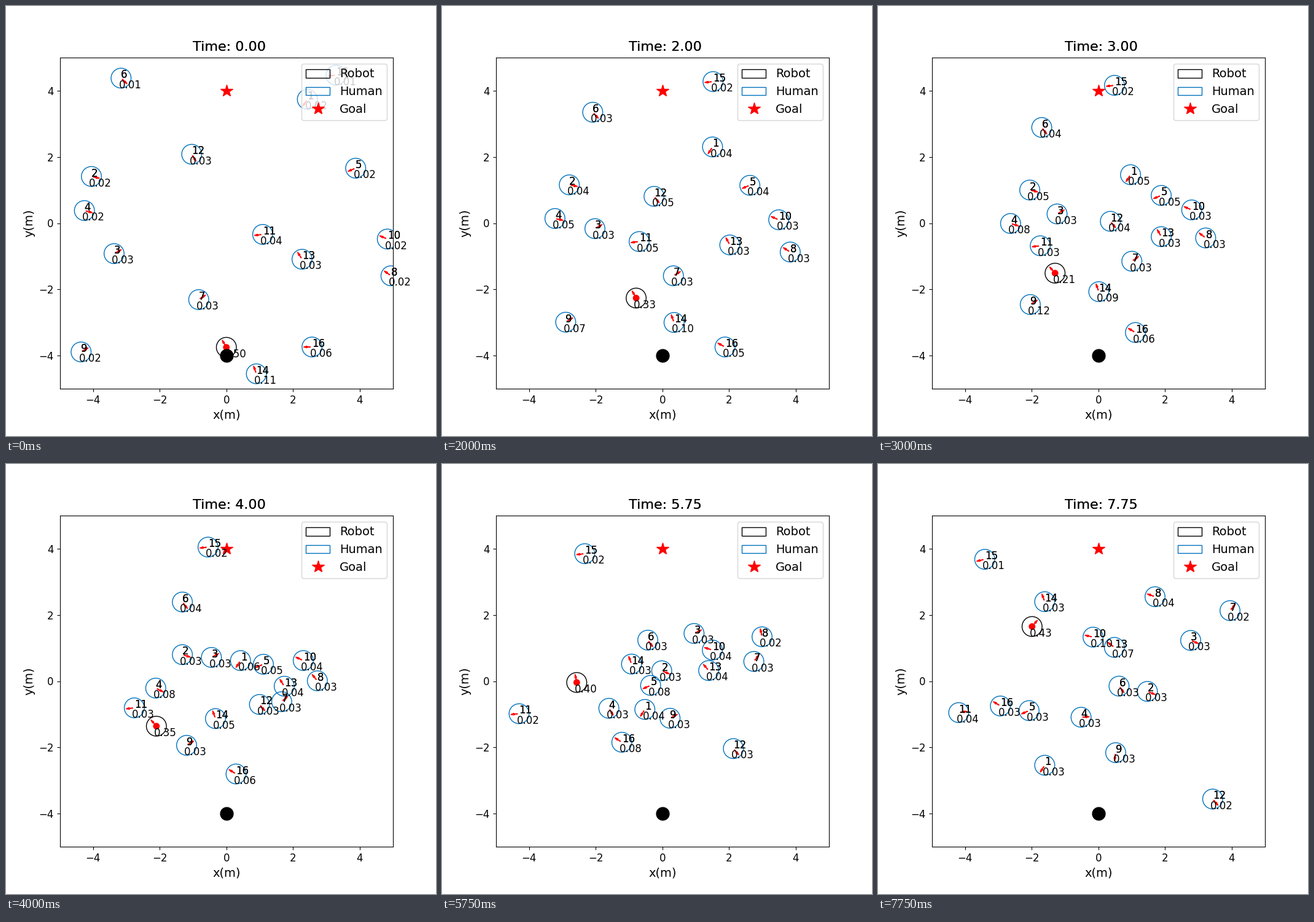
A matplotlib script for the animation above (8000 ms loop, 700 by 700 pixels).

```python
import numpy as np
import matplotlib.pyplot as plt
from matplotlib.animation import FuncAnimation
from matplotlib.lines import Line2D
from matplotlib.patches import ArrowStyle, Circle, FancyArrowPatch

STEP = 0.25
FRAMES = 32
END = (FRAMES - 1) * STEP
RADIUS = 0.3
BLUE = "#0072bd"
ARROW = ArrowStyle.Fancy(head_length=4, head_width=2, tail_width=0.6)

fig, ax = plt.subplots(figsize=(7, 7), dpi=100)
ax.tick_params(labelsize=12)
ax.set_xlim(-5, 5)
ax.set_ylim(-5, 5)
ax.set_xlabel("x(m)", fontsize=14)
ax.set_ylabel("y(m)", fontsize=14)


def ramp(t):
    """Time lost while speeding up from a slow start."""
    return t - 0.3 * (1 - np.exp(-2 * t))


def neighbour_span(a):
    """Difference between the next and the previous row, ends held."""
    padded = np.concatenate([a[:1], a, a[-1:]])
    return padded[2:] - padded[:-2]


def twin_text(x, y, label, **kw):
    """Two stacked copies, which gives the slightly heavier lettering."""
    return [ax.text(x, y, label, **kw) for _ in range(2)]


class Agent:
    """Follows a smooth curve through the (t, x, y) points where it turns."""

    def __init__(self, name, *turns):
        turns = np.array(turns, float)
        self.times = ramp(turns[:, 0])
        self.pts = turns[:, 1:]
        self.vel = neighbour_span(self.pts) / neighbour_span(self.times)[:, None]

        self.ring = Circle((0, 0), RADIUS, fill=False, color=BLUE if name else "black")
        self.arrow = FancyArrowPatch((0, 0), (RADIUS, 0), color="red", arrowstyle=ARROW)
        ax.add_artist(self.ring)
        ax.add_artist(self.arrow)
        self.names = twin_text(0, 0, name, fontsize=12)
        self.note = ax.text(0, 0, "", fontsize=12)

    def move(self, t):
        t = ramp(t)
        i = min(np.searchsorted(self.times, t, side="right"), len(self.times) - 1) - 1
        h = self.times[i + 1] - self.times[i]
        s = (t - self.times[i]) / h
        p, q = self.pts[i:i + 2]
        u, v = self.vel[i:i + 2] * h
        a, b = 2 * (p - q) + u + v, 3 * (q - p) - 2 * u - v
        self.pos = ((a * s + b) * s + u) * s + p
        slope = (3 * a * s + 2 * b) * s + u
        self.heading = slope / max(np.hypot(*slope), 1e-9)

    def draw(self, score):
        x, y = self.pos
        self.ring.center = self.pos
        self.arrow.set_positions(self.pos, self.pos + RADIUS * self.heading)
        for label in self.names:
            label.set_position(self.pos)
        self.note.set_position((x - 0.07, y - 0.3))
        self.note.set_text(f"{score:.2f}")


def attention(human):
    """Higher near the middle, and for people heading towards the robot."""
    base = 0.034 * np.exp(-np.sum(human.pos ** 2) / 30)
    gap = robot.pos - human.pos
    dist = np.hypot(*gap)
    closing = max(0, human.heading @ gap / dist)
    return base + 0.22 * closing * np.exp(-dist / 1.6)


robot = Agent("", (0, 0, -3.75), (3, -1.30, -1.51), (4, -2.10, -1.36),
              (5.75, -2.57, -0.04), (6.75, -2.57, 0.96), (END, -1.99, 1.65))
dot = Circle((0, 0), 0.1, facecolor="red", linewidth=0)
ax.add_artist(dot)

humans = [
    Agent("1", (0, 2.43, 3.74), (END, -1.61, -2.54)),
    Agent("2", (0, -4.05, 1.41), (4, -1.32, 0.80), (END, 1.47, -0.31)),
    Agent("3", (0, -3.37, -0.92), (5.75, 0.95, 1.44), (6.75, 1.84, 1.60), (END, 2.77, 1.23)),
    Agent("4", (0, -4.26, 0.38), (4, -2.12, -0.21), (6.75, -1.29, -1.14), (END, -0.52, -1.09)),
    Agent("5", (0, 3.88, 1.66), (4, 1.11, 0.51), (END, -2.08, -0.89)),
    Agent("6", (0, -3.16, 4.38), (2, -2.09, 3.35), (4, -1.32, 2.39), (END, 0.62, -0.15)),
    Agent("7", (0, -0.83, -2.31), (4, 1.66, -0.62), (END, 3.95, 2.13)),
    Agent("8", (0, 4.94, -1.59), (4, 2.73, 0.01), (5, 3.08, 0.66),
          (6.75, 2.64, 2.21), (END, 1.70, 2.55)),
    Agent("9", (0, -4.36, -3.89), (5.75, 0.23, -1.12), (6.75, 0.67, -1.18), (END, 0.52, -2.16)),
    Agent("10", (0, 4.83, -0.48), (3, 2.80, 0.40), (5.75, 1.50, 0.94), (END, -0.16, 1.33)),
    Agent("11", (0, 1.09, -0.34), (5, -3.72, -0.92), (6.5, -4.60, -1.01), (END, -4.19, -0.95)),
    Agent("12", (0, -1.04, 2.08), (2, -0.25, 0.81), (END, 3.43, -3.56)),
    Agent("13", (0, 2.27, -1.09), (5.75, 1.39, 0.32), (END, 0.48, 1.02)),
    Agent("14", (0, 0.90, -4.55), (2, 0.35, -3.00), (END, -1.61, 2.40)),
    Agent("15", (0, 3.29, 4.47), (5.75, -2.33, 3.85), (6.75, -3.16, 3.74), (END, -3.41, 3.68)),
    Agent("16", (0, 2.57, -3.74), (2, 1.88, -3.74), (END, -2.94, -0.75)),
]

ax.add_artist(Line2D([0], [-4], color="black", marker="o", linestyle="None", markersize=15))
goal = Line2D([0], [4], color="red", marker="*", linestyle="None", markersize=15)
ax.add_artist(goal)
ax.legend([robot.ring, humans[0].ring, goal], ["Robot", "Human", "Goal"],
          fontsize=14, loc="upper right")
clock = twin_text(0.4, 1.02, "", fontsize=16, transform=ax.transAxes)


def draw(frame):
    t = frame * STEP
    for agent in [robot, *humans]:
        agent.move(t)
    scores = [attention(human) for human in humans]
    for human, score in zip(humans, scores):
        human.draw(score)
    robot.draw(1 - sum(scores))
    dot.center = robot.pos
    for label in clock:
        label.set_text(f"Time: {t:.2f}")


anim = FuncAnimation(fig, draw, frames=FRAMES, interval=250, repeat=True, repeat_delay=0)
plt.show()
```
